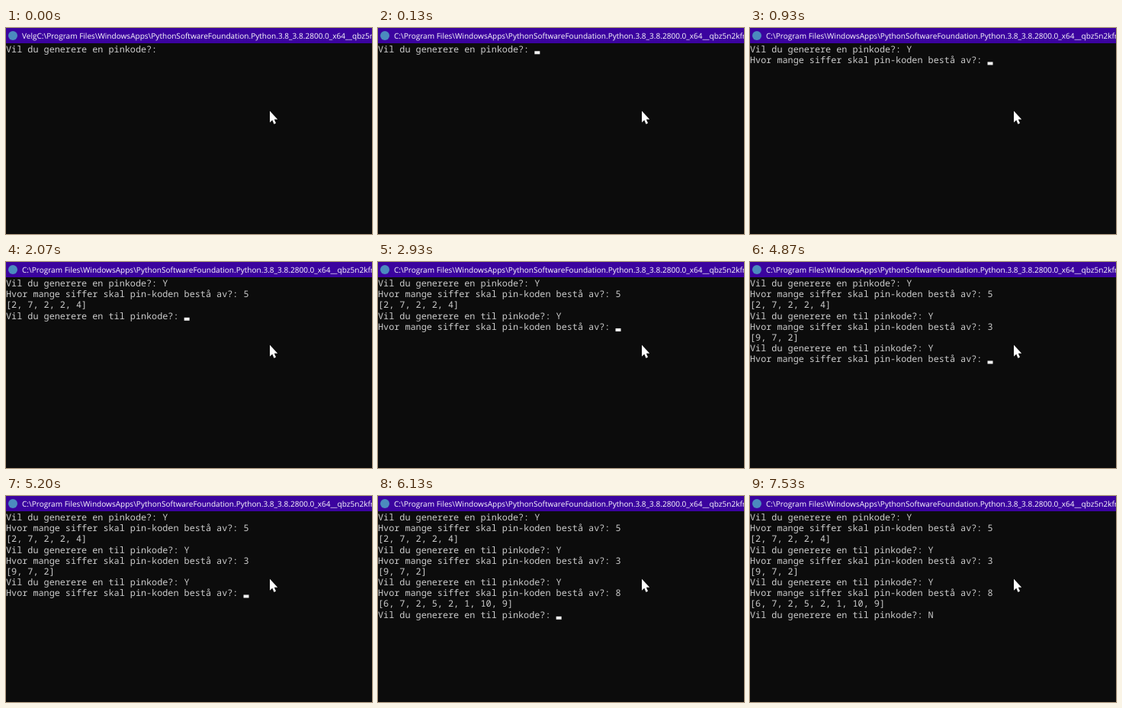
An HTML page for the animation above (8000 ms loop, 480 by 270 pixels).

```html
<!DOCTYPE html>
<html lang="no">
<head>
<meta charset="utf-8">
<style>
  html, body { margin: 0; width: 100%; height: 100%; overflow: hidden; background: #0c0c0c; }
  body { position: relative; text-rendering: geometricPrecision; }
  body > * { position: absolute; margin: 0; white-space: pre; }
  #bar { left: 0; top: 0; width: 100%; height: 20px; background: #3b039f; }
  #icon { left: 3px; top: 4px; width: 12px; height: 12px; border-radius: 50%; background: #4b8bbe; }
  #title { left: 21px; top: 0; color: #fff; font: 500 10.05px/21px "Open Sans", sans-serif; }
  #text { left: 0; top: 21px; color: #ccc; font: 11.8px/14.17px "Noto Sans Mono", monospace; }
  #caret { left: 0; top: 0; width: 7px; height: 3.5px; background: #f2f2f2; }
  #mouse { left: 344px; top: 107px; }
</style>
</head>
<body>
<div id="bar"></div>
<div id="icon"></div>
<div id="title"></div>
<pre id="text"></pre>
<div id="caret"></div>
<svg id="mouse" width="16" height="22">
  <path d="M2 1.8V16.8L5.3 13.7L7.5 18.9L10 17.8L7.8 12.7H12.2Z" fill="#fff"/>
</svg>
<script>
const LOOP = 8000, CELL_W = 7.08, CELL_H = 14.17;
const PATH = 'C:\\Program Files\\WindowsApps\\PythonSoftwareFoundation.Python.3.8_3.8.2800.0_x64__qbz5n2kfr';
const DIGITS = '\nHvor mange siffer skal pin-koden bestå av?: ';
const AGAIN = '\nVil du generere en til pinkode?: ';

// [time in ms, text added to the console]
const output = [
  [0, 'Vil du generere en pinkode?: '],
  [330, 'Y'], [470, DIGITS],
  [1600, '5'], [1800, '\n[2, 7, 2, 2, 4]' + AGAIN],
  [2600, 'Y'], [2870, DIGITS],
  [3730, '3'], [3865, '\n[9, 7, 2]' + AGAIN],
  [4670, 'Y'], [4870, DIGITS],
  [5870, '8'], [6000, '\n[6, 7, 2, 5, 2, 1, 10, 9]' + AGAIN],
  [7000, 'N'], [7470, '\n']
];

const [title, text, caret] = ['title', 'text', 'caret'].map(id => document.getElementById(id));

function draw(now) {
  const t = now % LOOP;
  const shown = output.filter(([at]) => at <= t).map(([, part]) => part).join('');
  const lines = shown.split('\n');
  const row = lines.length - 1, col = lines[row].length;
  title.textContent = (t < 70 ? 'Velg' : '') + PATH;
  text.textContent = shown;
  caret.style.transform = `translate(${col * CELL_W}px, ${30.3 + row * CELL_H}px)`;
  caret.style.visibility = t >= 130 && t < 7530 ? 'visible' : 'hidden';
}

let start;
function tick(now) {
  start ??= now;
  draw(now - start);
  requestAnimationFrame(tick);
}
draw(0);
requestAnimationFrame(tick);
</script>
</body>
</html>
```
